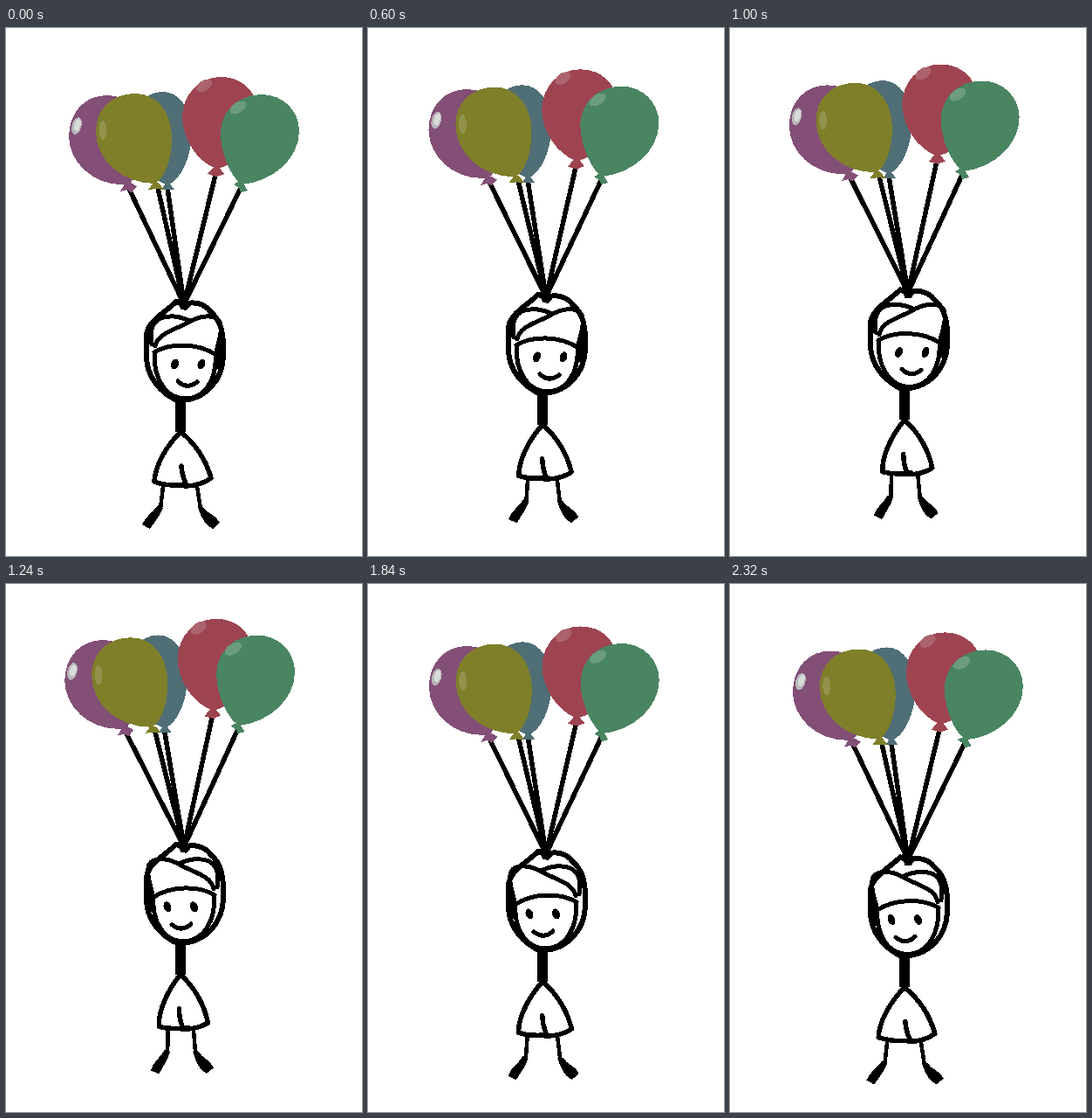
Write an HTML page that moves like this. It is 408 by 604 pixels and loops after 2360 ms.

```html
<!DOCTYPE html>
<html lang="en">
<head>
<meta charset="utf-8">
<title>Balloon ride</title>
<style>
  html, body { margin: 0; width: 100%; height: 100%; overflow: hidden; background: #fff; }
  svg { display: block; width: 100%; height: 100%; }
  .ink { fill: none; stroke: #000; stroke-width: 6; stroke-linecap: round; stroke-linejoin: round; }
  .solid { fill: #000; stroke: none; }
</style>
</head>
<body>
<svg viewBox="0 0 408 604" shape-rendering="crispEdges">
  <g id="rider">
    <g id="bunch">
      <g class="ink" stroke-linecap="butt" style="stroke-width:5.5">
        <path d="M142 186L204 316M174 183L204 316M185 183L204 316M240 168L204 316M268 185L204 316"/>
      </g>
      <g fill="#834f76">
        <path d="M140 179C102 182 72 155 72 123C73 95 91 77 116 77C145 77 158 100 156 130C155 150 150 172 140 179Z"/>
        <path d="M137 177L131 187L139 185L143 188L150 181L143 177Z"/>
      </g>
      <g fill="#4f6e76">
        <path d="M185 180C160 170 140 140 140 118C141 90 160 73 180 73C200 73 213 95 213 120C212 150 200 174 185 180Z"/>
        <path d="M183 178L178 185L193 185L188 178Z"/>
      </g>
      <g fill="#7f7f2a">
        <path d="M171 178C134 178 103 152 103 118C103 92 122 75 148 75C173 75 190 96 190 126C190 150 182 172 171 178Z"/>
        <path d="M169 177L163 185L172 184L181 185L175 177Z"/>
      </g>
      <g fill="#9e4451">
        <path d="M241 161C218 152 202 126 202 101C203 75 222 56 246 56C270 56 289 72 289 100C289 130 265 157 241 161Z"/>
        <path d="M238 159L231 167L241 170L250 167L244 159Z"/>
      </g>
      <g fill="#4a8562">
        <path d="M270 179C255 168 245 138 246 118C248 92 268 76 293 76C318 76 336 95 336 118C336 150 305 176 270 179Z"/>
        <path d="M266 176L261 179L267 183L269 188L277 186L272 178Z"/>
      </g>
      <ellipse cx="81" cy="112" rx="5.5" ry="10" fill="#b9b6b9" transform="rotate(16 81 112)"/>
      <ellipse cx="82" cy="111" rx="3.5" ry="7" fill="#d9dcda" transform="rotate(16 82 111)"/>
      <ellipse cx="111" cy="117" rx="4.5" ry="11" fill="#92924c"/>
      <ellipse cx="227" cy="66" rx="10" ry="6" fill="#ac636d" transform="rotate(-32 227 66)"/>
      <ellipse cx="266" cy="91" rx="10.5" ry="6" fill="#6c9c80" transform="rotate(-30 266 91)"/>
    </g>

    <g class="ink">
      <path d="M200 428C176 418 161 398 161 376L161 350C164 334 182 326 195 313L204 317"/>
      <path d="M204 316C216 312 228 316 234 324C247 335 250 350 249 376C248 402 230 424 202 426"/>
      <path class="solid" d="M197 310L206 308L212 317L207 323L200 322Z"/>
      <path d="M200 424V462" style="stroke-width:12;stroke-linecap:butt"/>
    </g>

    <g id="head" class="ink" style="stroke-width:5">
      <path d="M170 371C169 400 182 423 205 424C228 424 242 402 240 372"/>
      <path d="M170 371C188 360 220 360 241 374"/>
      <path d="M171 364C174 348 196 345 212 335C226 328 240 328 245 336C249 346 243 361 240 374"/>
      <path d="M167 362C165 346 167 337 177 332C188 328 201 330 210 335"/>
      <path d="M246 352L243 388"/>
      <ellipse class="solid" cx="193.5" cy="384.500" rx="4.200" ry="6.200" transform="rotate(22 193.5 384.500)"/>
      <ellipse class="solid" cx="224" cy="384.500" rx="4.200" ry="6.200" transform="rotate(22 224 384.500)"/>
      <path d="M197 404Q207 414 219 405"/>
    </g>

    <g id="left" class="ink" style="stroke-width:5.5">
      <path d="M200 462C184 478 171 500 170 519Q183 524 203 523"/>
      <path d="M180 524L177 550" style="stroke-width:4.500"/>
      <path class="solid" d="M174 546L180 549C176 559 171 564 165 573L156 568C160 558 168 555 174 546Z"/>
    </g>
    <g id="right" class="ink" style="stroke-width:5.5">
      <path d="M200 462C218 476 230 496 235 515Q222 524 205 524"/>
      <path d="M201 501Q202 514 207 523"/>
      <path d="M219 524L223 550" style="stroke-width:4.500"/>
      <path class="solid" d="M220 549L226 548C231 556 241 557 245 566L237 573C228 569 224 560 220 549Z"/>
    </g>
  </g>
</svg>
<script>
  const LOOP = 2360, HALF = LOOP / 2, STEP = 40;
  const RISE = 16, TILT = -1.5, LEFT_SWING = -5.5, RIGHT_SWING = 4;
  const move = (id, value) => document.getElementById(id).setAttribute("transform", value);

  function draw(now) {
    const t = Math.floor((now % LOOP) / STEP) * STEP;
    const lift = 1 - Math.abs(t - HALF) / HALF;

    move("rider", `translate(0 ${-RISE * lift})`);
    move("bunch", `rotate(${TILT * lift} 204 316)`);
    move("left", `rotate(${LEFT_SWING * lift} 200 462)`);
    move("right", `rotate(${RIGHT_SWING * lift} 200 462)`);
    // The head looks the other way on the descent.
    move("head", t < HALF ? "" : "translate(409 0) scale(-1 1)");
  }

  const start = performance.now();
  function tick() {
    draw(performance.now() - start);
    requestAnimationFrame(tick);
  }
  tick();
</script>
</body>
</html>
```
